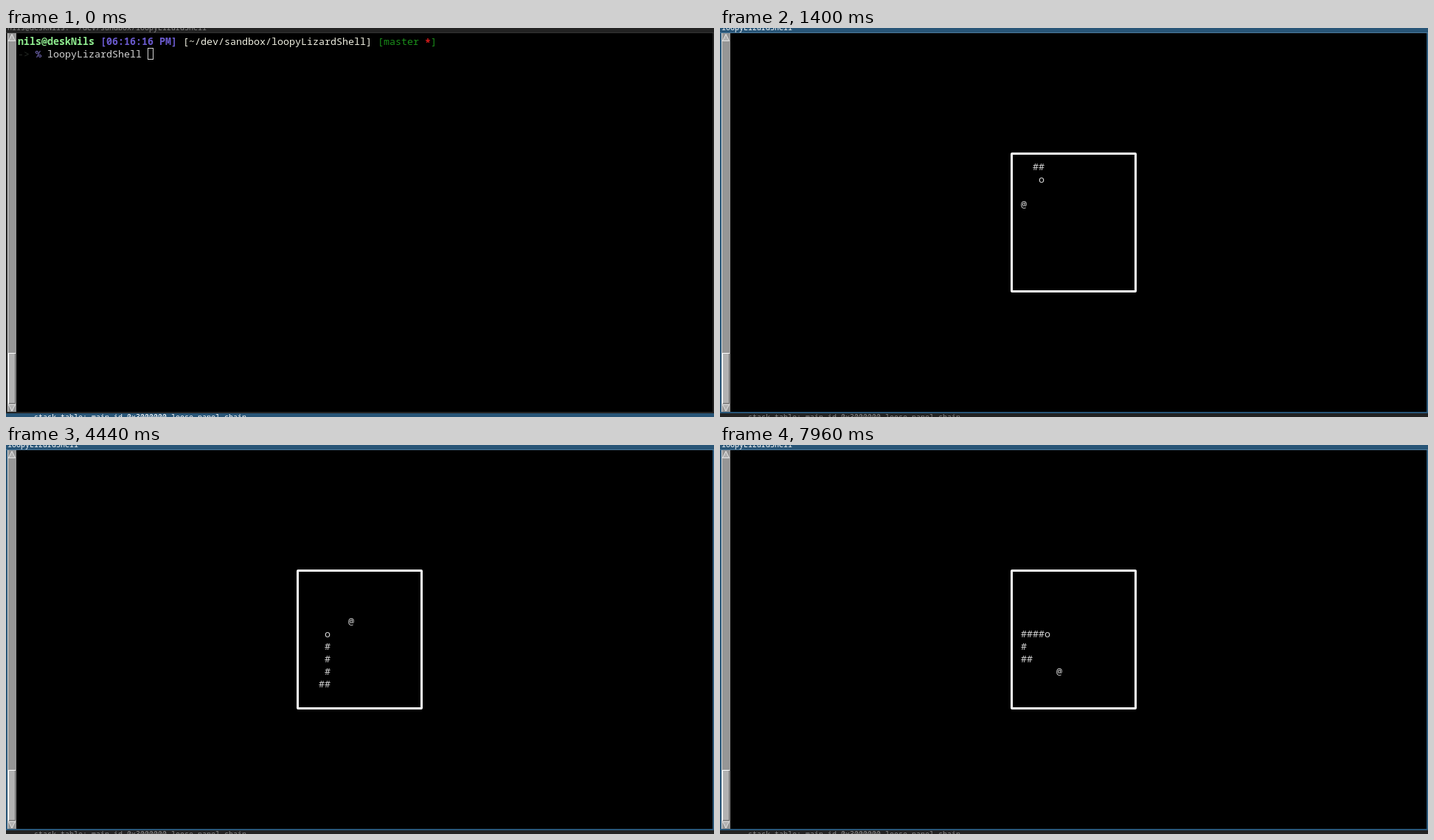
These frames come from a looping animation (960 by 528 pixels, 8 s). An HTML page:

```html
<!DOCTYPE html>
<html lang="en">
<head>
<meta charset="utf-8">
<title>Terminal snake</title>
<style>
  html, body { margin: 0; width: 100%; height: 100%; overflow: hidden; background: #000; }
  svg { display: block; width: 960px; height: 528px; --frame: #222; --edge: #333; --title: #888; --below: #285577; --belowText: #fff; }
  svg.focused { --frame: #285577; --edge: #4c7899; --title: #fff; --below: #222; --belowText: #888; }
  text { font-family: "Noto Sans Mono", "DejaVu Sans Mono", monospace; white-space: pre; }
  .term { font-size: 13.333px; fill: #d3d3d3; }
  .bar { font-size: 10px; }
  .bold { font-weight: 600; }
  .frame { fill: var(--frame); }
  .focused .cursor { fill: #d3d3d3; }
</style>
</head>
<body>
<svg id="stage" viewBox="0 0 960 528">
  <rect width="960" height="528"/>

  <!-- window frame -->
  <rect class="frame" width="960" height="6"/>
  <rect y="6" width="960" height="1" fill="var(--edge)"/>
  <rect class="frame" y="7" width="2" height="516"/>
  <rect class="frame" x="958" y="7" width="2" height="516"/>
  <rect class="frame" y="521" width="960" height="2"/>
  <rect y="523" width="960" height="5" fill="var(--below)"/>
  <text class="bar" id="title" x="2" y="3" fill="var(--title)"></text>
  <text class="bar" x="38" y="532" fill="var(--belowText)">stack table: main id 0x3000000 loose panel chain</text>

  <!-- scrollbar -->
  <rect x="2" y="7" width="12" height="514" fill="#969696"/>
  <rect x="2" y="7" width="1" height="514" fill="#dcdcdc"/>
  <path d="M8 8.500L3.500 17.500H12.500Z M3.500 511H12.500L8 520Z" fill="#b2b2b2" stroke="#e4e4e4"/>
  <rect x="3" y="441" width="10" height="69" fill="#b2b2b2"/>
  <path d="M3.500 510V441.500H13" fill="none" stroke="#fff"/>
  <path d="M12.500 442V509.500H4" fill="none" stroke="#666"/>

  <g id="prompt" class="term">
    <text class="bold" x="16" y="23" fill="#90ee90">nils@deskNils</text>
    <text class="bold" x="128" y="23" fill="#6a5acd">[06:16:16 PM]</text>
    <text x="240" y="23" fill="#eeeee0">[~/dev/sandbox/loopyLizardShell]</text>
    <text x="504" y="23" fill="#1a8f1a">[master <tspan class="bold" dy="2" fill="#dd1c1c">*</tspan><tspan dy="-2">]</tspan></text>
    <text x="16" y="40" fill="#262a26">-&gt;</text>
    <text x="40" y="40" fill="#8478d0">%</text>
    <text x="56" y="40">loopyLizardShell</text>
    <rect class="cursor" x="192.500" y="27.500" width="7" height="15" fill="none" stroke="#d3d3d3"/>
  </g>

  <g id="game">
    <rect x="395.500" y="170.500" width="168" height="187" rx=".5" fill="none" stroke="#fff" stroke-width="3"/>
    <g id="board" class="term"></g>
  </g>
</svg>
<script>
const LOOP = 8000, FOCUS = 200, LAUNCH = 640, FIRST_TICK = 820, TICK = 150;
const MOVES = "RRRDDDDLL" + "LURDLDDD" + "DRRRUUUUURRRRRD" + "DDLLLLL" + "LLLUURRRR";
const STEP = { R: [1, 0], L: [-1, 0], U: [0, -1], D: [0, 1] };
const FOODS = [[0, 3], [0, 8], [3, 8], [7, 3], [0, 6], [6, 7]];

const byId = id => document.getElementById(id);
const stage = byId("stage"), title = byId("title"), board = byId("board");
const show = (id, on) => byId(id).setAttribute("visibility", on ? "visible" : "hidden");
const same = (a, b) => a[0] === b[0] && a[1] === b[1];

// Play the whole round once and keep the board after every move.
function playRound() {
  let snake = [[0, 0], [0, 1], [0, 2]], eaten = 0;
  const states = [{ snake, food: FOODS[0] }];
  for (const move of MOVES) {
    const [dx, dy] = STEP[move], [x, y] = snake[0];
    const head = [x + dx, y + dy];
    const ate = same(head, FOODS[eaten]);
    snake = [head, ...(ate ? snake : snake.slice(0, -1))];
    if (ate) eaten++;
    states.push({ snake, food: FOODS[eaten] });
  }
  return states;
}

const glyph = (char, [x, y]) => `<text x="${408 + 8 * x}" y="${193 + 17 * y}">${char}</text>`;
const boards = playRound().map(({ snake, food }) =>
  glyph("@", food) + snake.map((cell, i) => glyph(i ? "#" : "o", cell)).join(""));

let shown = -1;
function draw(now) {
  const t = now % LOOP, playing = t >= LAUNCH;
  stage.classList.toggle("focused", t >= FOCUS);
  title.textContent = playing ? "loopyLizardShell" : "nils@deskNils: ~/dev/sandbox/loopyLizardShell";
  show("prompt", !playing);
  show("game", playing);
  const tick = Math.floor((t - FIRST_TICK) / TICK) + 1;
  const state = Math.max(0, Math.min(boards.length - 1, tick));
  if (state !== shown) board.innerHTML = boards[shown = state];
}

const start = performance.now();
function loop() {
  draw(performance.now() - start);
  requestAnimationFrame(loop);
}
loop();
</script>
</body>
</html>
```
